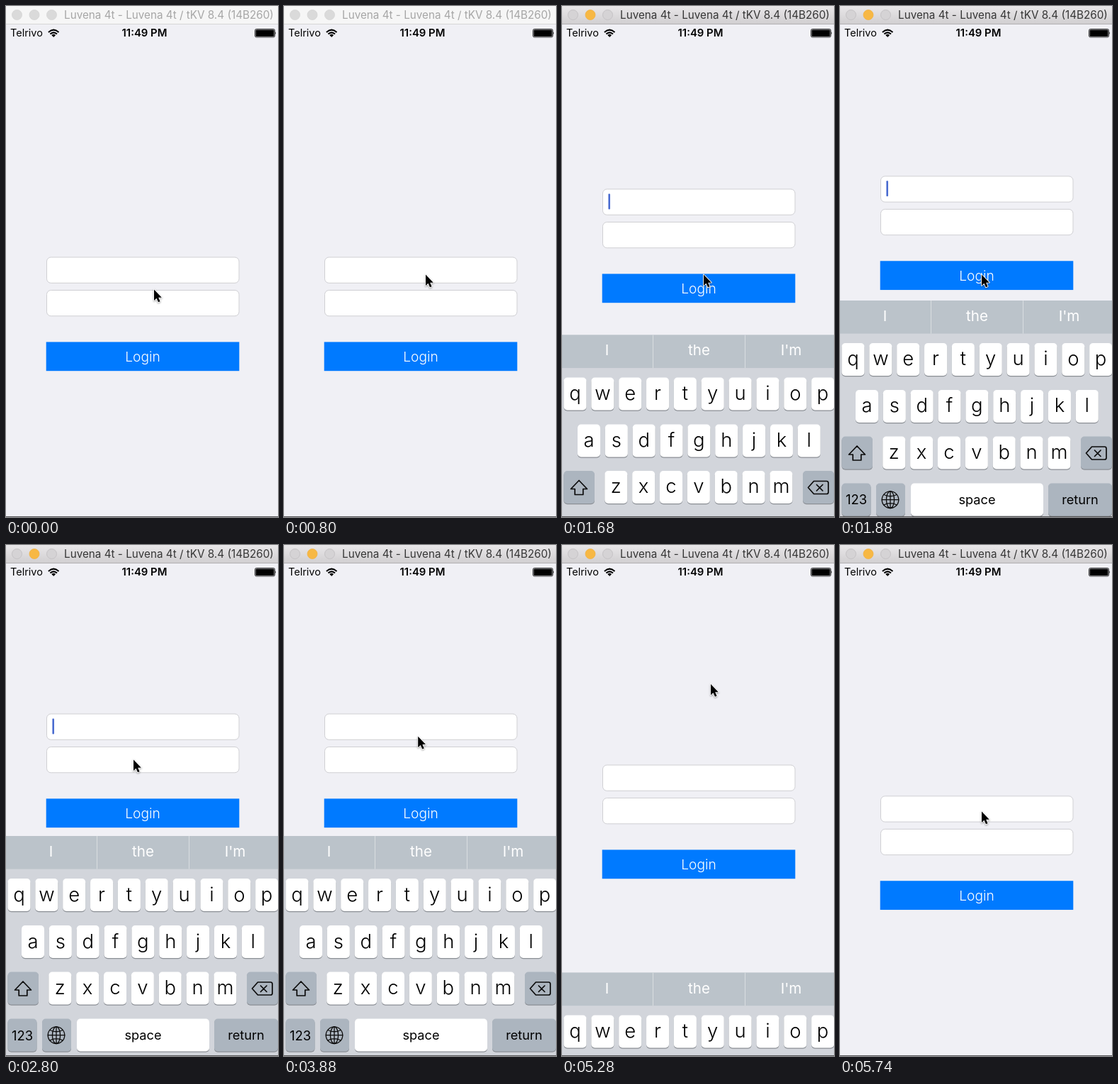
Write an HTML page that moves like this. It is 384 px wide and 720 px high and loops after 5760 ms.

```html
<!DOCTYPE html>
<html lang="en">
<head>
<meta charset="utf-8">
<title>Login form</title>
<style>
html, body { margin: 0; width: 100%; height: 100%; overflow: hidden; background: #f0f0f5; }
svg { display: block; width: 384px; height: 720px; }
text { font-family: Inter, Roboto, sans-serif; text-anchor: middle; }
#pointer { filter: drop-shadow(0 1px 1px rgba(0, 0, 0, .35)); }
</style>
</head>
<body>
<svg viewBox="0 0 384 720">
  <defs>
    <linearGradient id="bar" x2="0" y2="1">
      <stop stop-color="#e9e7e9"/><stop offset="1" stop-color="#d1cfd1"/>
    </linearGradient>
  </defs>
  <rect width="384" height="720" fill="#f0f0f5"/>

  <g id="form">
    <g fill="#fff" stroke="#cfcfd3">
      <rect x="57.5" y="354" width="271.5" height="36.3" rx="6"/>
      <rect x="57.5" y="400.5" width="271.5" height="36.3" rx="6"/>
    </g>
    <rect x="56.7" y="473.4" width="272.6" height="40.8" fill="#007aff"/>
    <text x="193" y="501" font-size="19.2" font-weight="350" fill="#fff">Login</text>
    <rect id="caret" x="65.4" width="2.6" height="22" rx="1" fill="#4a6cd0"/>
  </g>

  <g id="keyboard">
    <rect width="384" height="330" fill="#d2d5db"/>
    <rect width="384" height="46.6" fill="#bbc3ca"/>
    <path d="M128.5 0V46.6M258.5 0V46.6" stroke="#d9dde1"/>
    <g id="words" font-size="20.6" fill="#fff">
      <text x="63.5" y="29">I</text>
      <text x="193.5" y="29">the</text>
      <text x="323.5" y="29">I'm</text>
    </g>
    <g id="keys"></g>
    <g fill="none" stroke="#0b0b0b" stroke-width="1.7" stroke-linejoin="round" stroke-linecap="round">
      <path d="M24 205L35.5 217H29.8V225H18.2V217H12.5Z"/>
      <path d="M355.5 206H373.5Q376 206 376 208.5V221.5Q376 224 373.5 224H355.5L347.5 215ZM359.5 211L368 219.5M368 211L359.5 219.5"/>
      <g stroke-width="1.3">
        <circle cx="71" cy="280.7" r="11.8"/>
        <ellipse cx="71" cy="280.7" rx="5.6" ry="11.8"/>
        <path d="M71 269V292.5M59.2 280.7H82.8M62 273.5Q71 278 80 273.5M62 288Q71 283.4 80 288"/>
      </g>
    </g>
  </g>

  <rect id="barBack" width="384" height="25"/>
  <rect id="barLine" y="25" width="384" height="1"/>
  <g id="dots">
    <circle cx="15.5" cy="12.5" r="7"/>
    <circle cx="40" cy="12.5" r="7"/>
    <circle cx="64.5" cy="12.5" r="7"/>
  </g>
  <text id="title" x="230" y="18.3" font-size="15.25">Luvena 4t - Luvena 4t / tKV 8.4 (14B260)</text>

  <text x="6" y="43.3" font-size="14.5" style="text-anchor:start">Telrivo</text>
  <g fill="none" stroke="#000" stroke-width="2">
    <path d="M59.9 36.9Q67.2 30.4 74.5 36.9M62.4 39.6Q67.2 35.2 72 39.6"/>
    <path d="M67.2 44L64.3 41Q67.2 38.4 70.1 41Z" fill="#000" stroke="none"/>
  </g>
  <text x="195.5" y="43.3" font-size="14.9" font-weight="600">11:49 PM</text>
  <rect x="351.5" y="32.5" width="28" height="11.5" rx="2" fill="none" stroke="#000" stroke-width=".8"/>
  <rect x="352.5" y="33.5" width="26" height="9.5" rx="1"/>
  <path d="M380.4 36.3Q382 38.3 380.4 40.4Z"/>

  <rect y="719" width="384" height="1" fill="#58585a"/>
  <path id="pointer" d="M0 0V15.4L3.5 12.2L6 17.8L8.6 16.7L6.2 11.2H10.8Z"
    stroke="#fff" stroke-width="1.8" stroke-linejoin="round" paint-order="stroke"/>
</svg>

<script>
const LOOP = 5760, ACTIVATE = 1180, FOCUS = 1461, SWITCH = 3100, DISMISS = 5136;
const $ = id => document.getElementById(id);
const set = (el, attrs) => { for (const k in attrs) el.setAttribute(k, attrs[k]); };

function add(tag, attrs, label) {
  const el = document.createElementNS('http://www.w3.org/2000/svg', tag);
  set(el, attrs);
  if (label) el.textContent = label;
  $('keys').appendChild(el);
}

function key(x, y, w, fill, label, size, base, weight = 400) {
  add('rect', { x, y: y + 1.3, width: w, height: 46, rx: 5, fill: '#8b8f95' });
  add('rect', { x, y, width: w, height: 46, rx: 5, fill });
  if (label) add('text', { x: x + w / 2, y: y + base, 'font-size': size, 'font-weight': weight }, label);
}

const LIGHT = '#fff', DARK = '#acb5bf';
[['qwertyuiop', 18.5, 60], ['asdfghjkl', 38, 126], ['zxcvbnm', 76.3, 191.5]].forEach(([row, x, y]) =>
  [...row].forEach((c, i) => key(x + i * 38.85 - 16, y, 32, LIGHT, c, 27.5, 31.5, 350)));
key(2.5, 191.5, 43.5, DARK);
key(340, 191.5, 44, DARK);
key(2.5, 257.5, 41, DARK, '123', 18.4, 30);
key(51, 257.5, 41, DARK);
key(100, 257.5, 187, LIGHT, 'space', 18.2, 29.5);
key(294, 257.5, 90, DARK, 'return', 18.2, 29.5);

// Critically damped spring, 0 to 1
function spring(ms) {
  const u = Math.max(0, ms) * 0.0145;
  return 1 - (1 + u) * Math.exp(-u);
}

// Pointer stops: time, x, y
const stops = [
  [0, 209, 399.5], [60, 209, 399.5], [480, 186, 386], [780, 200, 378.5], [2360, 200, 378.5],
  [2780, 180, 302.5], [3520, 180, 302.5], [4500, 210, 196], [5300, 210, 196], [5720, 200, 375.5], [LOOP, 200, 375.5]
];

function pointerAt(t) {
  const i = stops.findIndex(s => s[0] > t);
  const [t0, x0, y0] = stops[i - 1], [t1, x1, y1] = stops[i];
  const u = (t - t0) / (t1 - t0), e = u * u * (3 - 2 * u);
  return [x0 + (x1 - x0) * e, y0 + (y1 - y0) * e];
}

// Steady, fade out, hidden, fade in
function blink(ms) {
  const p = ms % 1000;
  if (p < 500) return 1;
  if (p < 650) return (650 - p) / 150;
  return p < 880 ? 0 : (p - 880) / 120;
}

function draw(t) {
  const active = t >= ACTIVATE;
  set($('barBack'), { fill: active ? 'url(#bar)' : '#f6f6f6' });
  set($('barLine'), { fill: active ? '#b2b0b2' : '#d6d6d6' });
  set($('title'), { fill: active ? '#363636' : '#a6a6a6' });
  [...$('dots').children].forEach((dot, i) => set(dot, {
    fill: active && i === 1 ? '#f7b844' : active ? '#d5d3d5' : '#dadada',
    stroke: !active ? '#d3d3d3' : i === 1 ? '#f0b244' : '#bfbdbf',
    'stroke-width': 0.8
  }));

  const up = spring(t - FOCUS) - spring(t - DISMISS);
  set($('form'), { transform: `translate(0 ${-116 * up})` });
  set($('keyboard'), { transform: `translate(0 ${720 - 310 * up})` });
  set($('words'), { opacity: t >= 1600 ? 1 : 0 });

  const second = t >= SWITCH, focused = t >= FOCUS - 20 && t < DISMISS;
  set($('caret'), {
    y: second ? 407 : 360.5,
    opacity: focused ? blink(t - (second ? SWITCH : FOCUS - 20)) : 0
  });
  set($('pointer'), { transform: `translate(${pointerAt(t)})` });
}

const start = performance.now();
function tick() {
  draw((performance.now() - start) % LOOP);
  requestAnimationFrame(tick);
}
tick();
</script>
</body>
</html>
```
